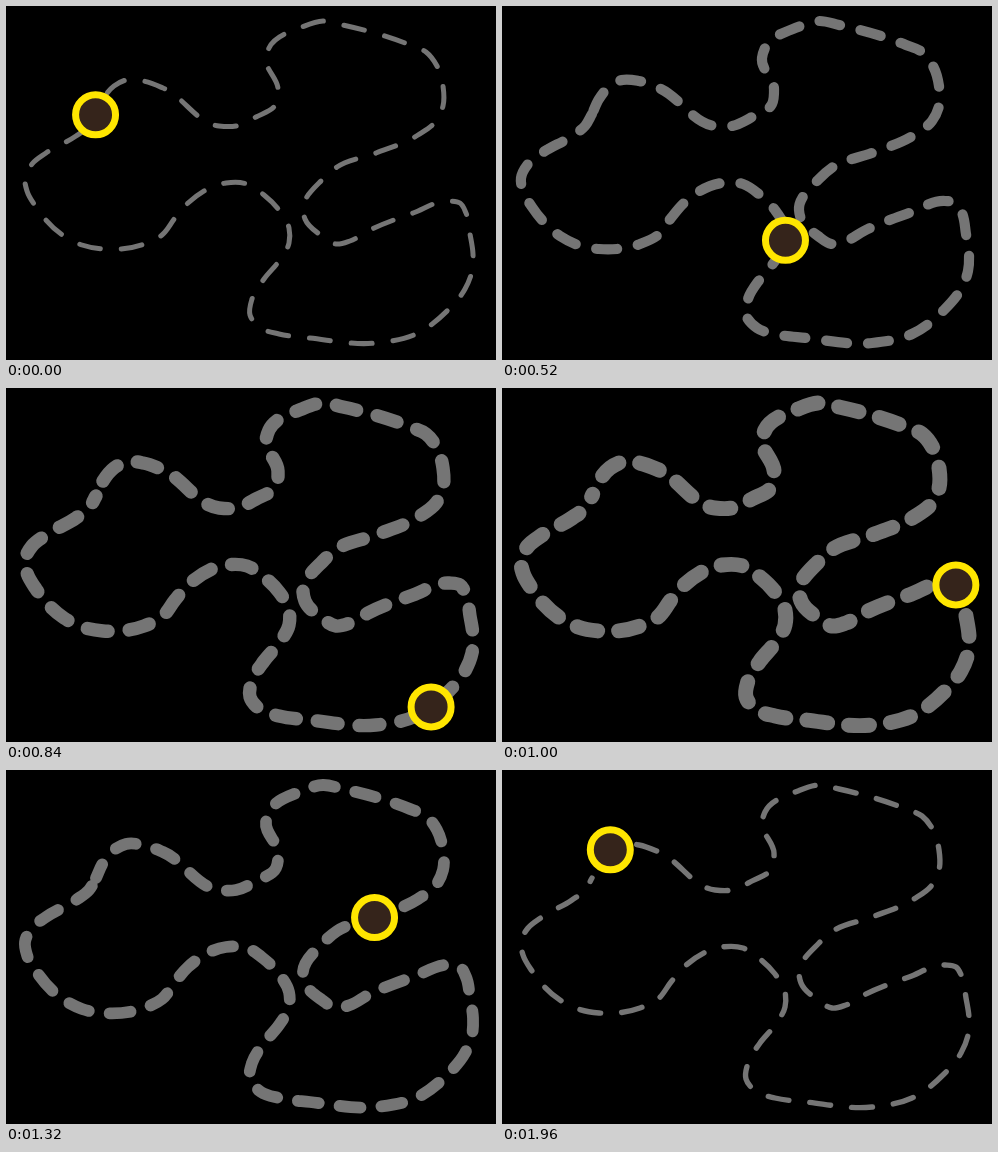
An HTML page that plays this animation: 490x354 px, repeating every 2000 ms.

```html
<!DOCTYPE html>
<html lang="en">
<head>
<meta charset="utf-8">
<title>Dashed track</title>
<style>
  html, body { margin: 0; width: 100%; height: 100%; overflow: hidden; background: #000; }
  svg { display: block; width: 490px; height: 354px; }
</style>
</head>
<body>
<svg viewBox="0 0 490 354">
  <path id="track" pathLength="1740" fill="none" stroke="#757575" stroke-linecap="round"/>
  <circle id="ball" r="20" fill="#35241b" stroke="#ffe600" stroke-width="7"/>
</svg>
<script>
const LOOP = 2000;
const PERIOD = 41.86;
const DASH = PERIOD / 2;
const FIRST_DASH = 20.5;
const DRIFT = 0.0405;

const points = `90,108 83,120 70,130 40,147 26,158 19,172 21,185 30,201 58,230 76,239
  97,243 138,238 156,229 169,212 182,197 220,177 241,178 258,189 273,204 283,222
  283,237 273,255 258,273 246,293 244,309 255,322 273,328 304,332 370,337 410,328
  442,304 459,283 466,265 467,248 464,228 460,207 454,197 443,195 407,207 362,225
  344,235 330,238 316,230 299,213 297,204 317,173 331,161 370,147 412,129 430,115
  437,100 437,80 431,60 420,46 404,39 337,19 317,15 296,21 263,42 260,52
  272,83 270,98 250,111 230,120 213,120 157,82 137,75 120,74 108,80 97,93 90,108`
  .trim().split(/\s+/).map(p => p.split(',').map(Number));

const track = document.getElementById('track');
const ball = document.getElementById('ball');

const distance = (a, b) => Math.hypot(b[0] - a[0], b[1] - a[1]);
const direction = (a, b) => [0, 1].map(k => (b[k] - a[k]) / distance(a, b));

// Unit tangent, weighted so that unevenly spaced points still give round bends.
function tangent(i) {
  const prev = points[i - 1], here = points[i], next = points[i + 1];
  if (!prev) return direction(here, next);
  if (!next) return direction(prev, here);
  const before = distance(prev, here), after = distance(here, next);
  const u = direction(prev, here), v = direction(here, next);
  const sum = [0, 1].map(k => u[k] * after + v[k] * before);
  return direction([0, 0], sum);
}

function smoothPath() {
  let d = 'M' + points[0];
  for (let i = 1; i < points.length; i++) {
    const a = points[i - 1], b = points[i];
    const ta = tangent(i - 1), tb = tangent(i);
    const handle = distance(a, b) / 3;
    const c1 = [0, 1].map(k => a[k] + ta[k] * handle);
    const c2 = [0, 1].map(k => b[k] - tb[k] * handle);
    d += `C${c1} ${c2} ${b}`;
  }
  return d;
}

track.setAttribute('d', smoothPath());
track.setAttribute('stroke-dasharray', `${DASH} ${PERIOD - DASH}`);
const length = track.getTotalLength();

function draw(t) {
  const swell = 1 - Math.abs(1 - 2 * t / LOOP);
  track.setAttribute('stroke-width', 5 + 10 * swell);
  track.setAttribute('stroke-dashoffset', PERIOD - FIRST_DASH + DRIFT * t);
  const p = track.getPointAtLength(length * t / LOOP);
  ball.setAttribute('cx', p.x);
  ball.setAttribute('cy', p.y);
}

const start = performance.now();
function tick() {
  draw((performance.now() - start) % LOOP);
  requestAnimationFrame(tick);
}
draw(0);
requestAnimationFrame(tick);
</script>
</body>
</html>
```
